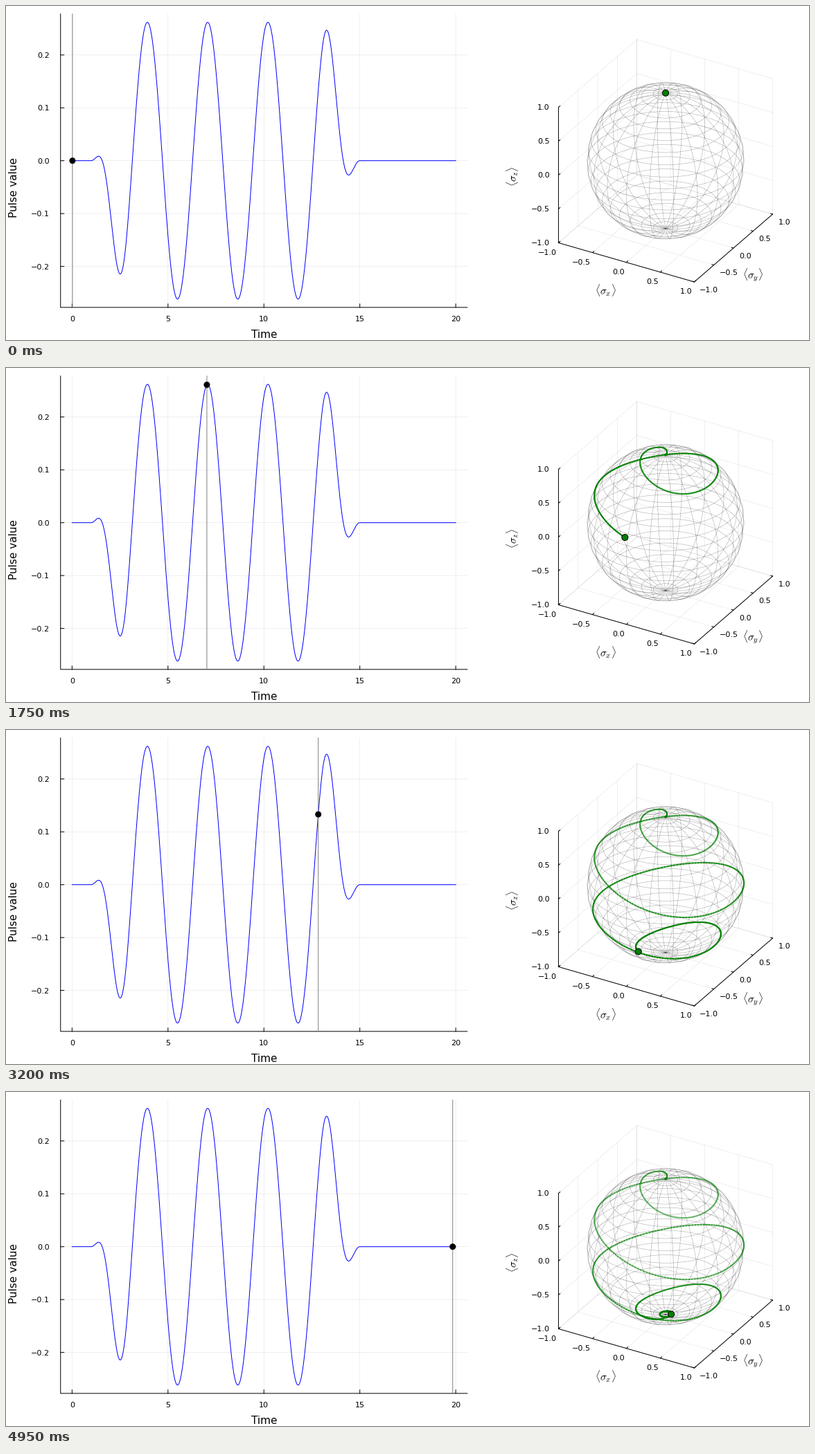
Recreate the animation shown at these times as a matplotlib script. Size 1159 by 483 pixels, loop 5 s.

```python
import numpy as np
import matplotlib.pyplot as plt
from matplotlib.animation import FuncAnimation
from matplotlib.collections import LineCollection
from matplotlib.patches import Circle

W, H, DPI = 1159, 483, 100
FRAMES, INTERVAL = 100, 50
PX = 72 / DPI  # points per pixel

OMEGA, AMP = 2.0, np.pi / 12
T_ON, T_OFF, RAMP, T_END = 1.0, 15.0, 2.0, 20.0
SAMPLES, STRIDE = 1000, 10
DT = T_END / (SAMPLES - 1)

X0, XS = 95.35, 27.69   # time axis: origin and pixels per unit
Y0, YS = 223.7, 764.5   # pulse axis
CX, CY, R = 952.0, 223.75, 113.15
C30, S30 = np.cos(np.pi / 6), 0.5


def pulse(t):
    """Sine carrier under a flat-top window with sin^2 ramps."""
    edge = np.clip(np.minimum(t - T_ON, T_OFF - t) / RAMP, 0, 1)
    return AMP * np.sin(np.pi / 2 * edge) ** 2 * np.sin(OMEGA * t)


def torque(t, b):
    return np.cross([2 * pulse(t), 0, OMEGA], b)


def evolve():
    """Bloch vector from the north pole, integrated with RK4."""
    states = [np.array([0.0, 0.0, 1.0])]
    for i in range(SAMPLES - 1):
        t, b = i * DT, states[-1]
        k1 = torque(t, b)
        k2 = torque(t + DT / 2, b + DT / 2 * k1)
        k3 = torque(t + DT / 2, b + DT / 2 * k2)
        k4 = torque(t + DT, b + DT * k3)
        states.append(b + DT / 6 * (k1 + 2 * k2 + 2 * k3 + k4))
    return np.array(states)


def project(x, y, z):
    """Orthographic view, azimuth 30 and elevation 30 degrees."""
    sx = CX + R * (C30 * x + S30 * y)
    sy = CY + R * (S30 * (S30 * x - C30 * y) - C30 * z)
    return np.stack(np.broadcast_arrays(sx, sy), axis=-1)


def at(t, v):
    return X0 + XS * t, Y0 - YS * v


fig = plt.figure(figsize=(W / DPI, H / DPI), dpi=DPI, facecolor="white")
ax = fig.add_axes([0, 0, 1, 1])
ax.set_xlim(0, W)
ax.set_ylim(H, 0)
ax.axis("off")


def line(points, color="black", width=1.0, **kw):
    xs, ys = zip(*points)
    return ax.plot(xs, ys, color=color, lw=width * PX, snap=False, **kw)[0]


def label(x, y, text, size=8, ha="center", **kw):
    ax.text(x, y, text, fontsize=size, ha=ha, va="center_baseline",
            family="DejaVu Sans", **kw)


def disc(radius, color, zorder):
    return ax.add_patch(Circle((0, 0), radius, fc=color, ec="black",
                               lw=PX, zorder=zorder))


def number(v):
    return f"{v:.1f}".replace("-", "\u2212")


def draw_pulse_plot():
    left, right = at(-0.6, 0)[0], at(20.6, 0)[0]
    top, bottom = at(0, 0.2775)[1], at(0, -0.2775)[1]
    grid = dict(width=0.6, alpha=0.1)
    for t in range(0, 21, 5):
        x = at(t, 0)[0]
        line([(x, top), (x, bottom)], **grid)
        line([(x, bottom), (x, bottom - 5)])
        label(x, 452, str(t))
    for v in np.arange(-2, 3) / 10:
        y = at(0, v)[1]
        line([(left, y), (right, y)], **grid)
        line([(left, y), (left + 5, y)])
        label(62.8, y, number(v), ha="right")
    line([(left, top), (left, bottom), (right, bottom)])
    t = np.linspace(0, T_END, SAMPLES)
    ax.plot(*at(t, pulse(t)), color="blue", lw=PX)
    label(372.5, 474.5, "Time", 11)
    label(12, 225, "Pulse value", 11, rotation=90)
    return top, bottom


def draw_sphere():
    ticks = np.linspace(-1, 1, 5)
    for v in ticks:
        for path in ([(v, -1, -1), (v, 1, -1), (v, 1, 1)],
                     [(1, v, -1), (-1, v, -1), (-1, v, 1)],
                     [(-1, -1, v), (-1, 1, v), (1, 1, v)]):
            line([project(*p) for p in path], width=0.6, alpha=0.1)

    arc = np.linspace(0, 2 * np.pi, 121)
    half = np.linspace(0, np.pi, 61)
    wires = [project(np.sin(a) * np.cos(arc), np.sin(a) * np.sin(arc), np.cos(a))
             for a in np.linspace(0, np.pi, 21)[1:-1]]
    wires += [project(np.sin(half) * np.cos(a), np.sin(half) * np.sin(a), np.cos(half))
              for a in np.linspace(0, 2 * np.pi, 21)[:-1]]
    ax.add_collection(LineCollection(wires, colors=[(0, 0, 0, 0.3)],
                                     linewidths=0.6 * PX, zorder=3))

    line([project(-1, -1, 1), project(-1, -1, -1),
          project(1, -1, -1), project(1, 1, -1)])
    for v in ticks:
        x, y = project(v, -1, -1)
        line([(x, y), (x + 2.2, y - 1.9)])
        label(x - 2.8, y + 13.2, number(v), ha="right")
        x, y = project(1, v, -1)
        line([(x, y), (x - 2.8, y - 0.8)])
        label(x + 7.8, y + 10.7, number(v), ha="left")
        x, y = project(-1, -1, v)
        line([(x, y), (x + 2.2, y - 1.9)])
        label(x - 13, y, number(v), ha="right")
    for x, y, name, turn in ((865, 411, "x", 0), (1078, 389, "y", 0), (731, 246, "z", 90)):
        ax.text(x, y, rf"$\langle\sigma_{name}\rangle$", fontsize=11, rotation=turn,
                ha="center", va="center", math_fontfamily="cm")


top, bottom = draw_pulse_plot()
draw_sphere()

track = project(*evolve().T)
segments = np.stack([track[:-1], track[1:]], axis=1)

cursor = line([(X0, top), (X0, bottom)], color="gray", zorder=4)
dot = disc(4, "black", 5)
trail = LineCollection([], linewidths=2 * PX, capstyle="projecting", zorder=6)
ax.add_collection(trail)
head = disc(4.5, "green", 7)


def update(frame):
    n = frame * STRIDE + 1
    t = n * DT
    x, y = at(t, pulse(t))
    cursor.set_xdata([x, x])
    dot.center = x, y
    colors = np.zeros((n, 4))
    colors[:, 1] = 0.5
    colors[:, 3] = np.linspace(0.2, 1, n)
    trail.set_segments(segments[:n])
    trail.set_color(colors)
    head.center = tuple(track[n])
    return cursor, dot, trail, head


anim = FuncAnimation(fig, update, frames=FRAMES, interval=INTERVAL,
                     repeat=True, repeat_delay=0)
plt.show()
```
